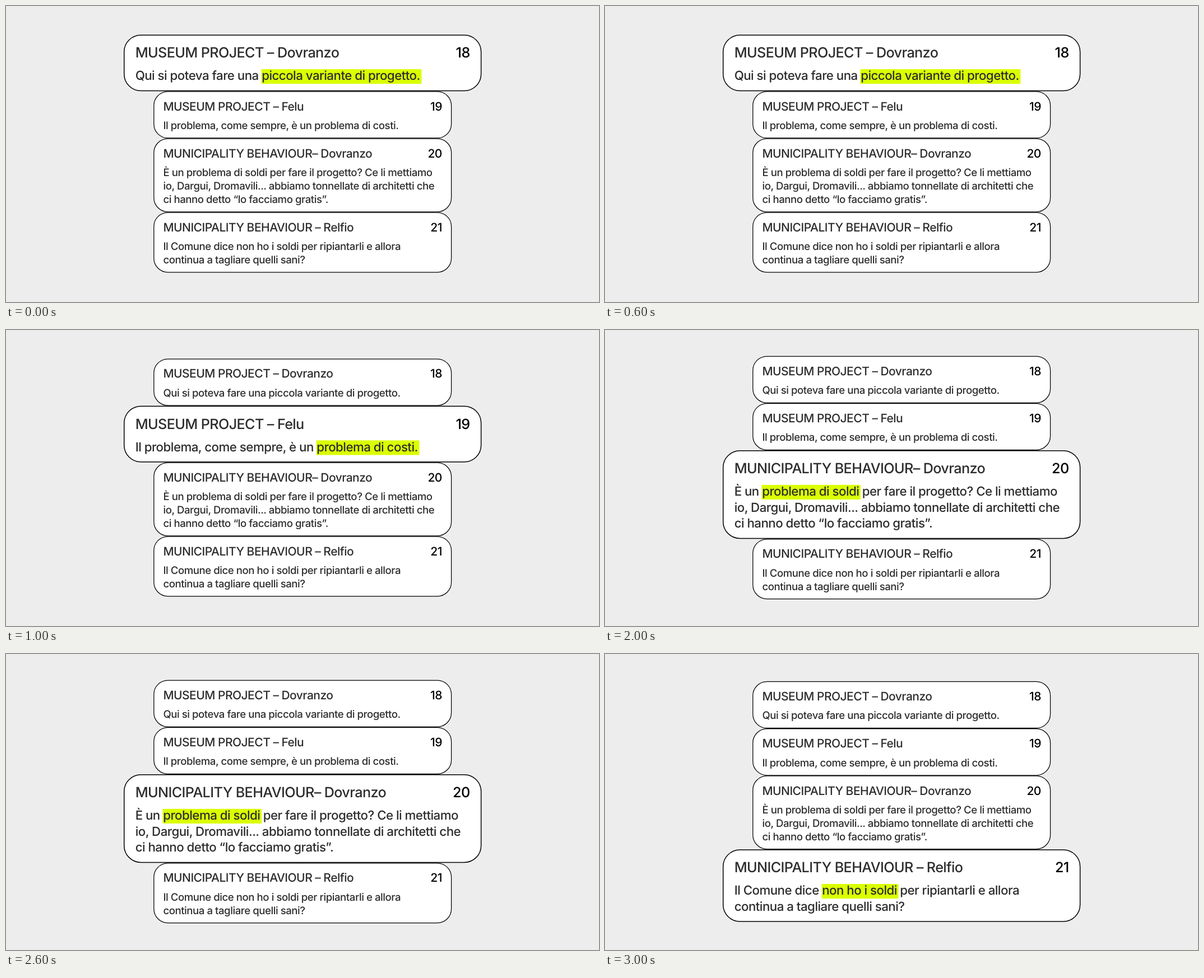
Animation of 1058 by 529 pixels, one loop 4 s. Source, as an HTML page:

```html
<!DOCTYPE html>
<html lang="it">
<head>
<meta charset="utf-8">
<title>Conversation cards</title>
<style>
  html, body { margin: 0; width: 100%; height: 100%; overflow: hidden; background: #ededed; }
  svg { display: block; }
  text {
    font-family: Inter, "Liberation Sans", sans-serif;
    font-optical-sizing: none;
    text-rendering: geometricPrecision;
    fill: #2d2d2d;
  }
  .title, .number { font-size: 21px; font-weight: 500; letter-spacing: -.025em; }
  .number { fill: #000; text-anchor: end; }
  .body { font-size: 18.6px; font-weight: 450; letter-spacing: -.024em; }
  .box { fill: #fff; stroke: #000; stroke-width: 1.25; }
  .mark { fill: #daff00; }
</style>
</head>
<body>
<svg id="stage" width="1058" height="529"></svg>
<script>
const STEP = 1000, WIDTH = 532, ZOOM = 1.2, LINE = 23.75;
const CENTER = { x: 529.2, y: 263.8 };
const stage = document.getElementById('stage');

const cards = [
  { title: 'MUSEUM PROJECT – Dovranzo', mark: 'piccola variante di progetto.',
    lines: ['Qui si poteva fare una piccola variante di progetto.'] },
  { title: 'MUSEUM PROJECT – Felu', mark: 'problema di costi.',
    lines: ['Il problema, come sempre, è un problema di costi.'] },
  { title: 'MUNICIPALITY BEHAVIOUR– Dovranzo', mark: 'problema di soldi',
    lines: ['È un problema di soldi per fare il progetto? Ce li mettiamo',
            'io, Dargui, Dromavili... abbiamo tonnellate di architetti che',
            'ci hanno detto “lo facciamo gratis”.'] },
  { title: 'MUNICIPALITY BEHAVIOUR – Relfio', mark: 'non ho i soldi',
    lines: ['Il Comune dice non ho i soldi per ripiantarli e allora',
            'continua a tagliare quelli sani?'] }
];

function add(parent, tag, attrs, content = '') {
  const el = document.createElementNS('http://www.w3.org/2000/svg', tag);
  for (const name in attrs) el.setAttribute(name, attrs[name]);
  el.textContent = content;
  return parent.appendChild(el);
}

function build(card, index) {
  card.height = 84.3 + LINE * (card.lines.length - 1);
  const g = card.group = add(stage, 'g', {});
  add(g, 'rect', { class: 'box', x: .62, y: .62, rx: 25, width: WIDTH - 1.24, height: card.height - 1.24 });
  card.highlight = add(g, 'rect', { class: 'mark', y: 51.5, height: 21.8 });
  add(g, 'text', { class: 'title', x: 17.2, y: 34.3 }, card.title);
  add(g, 'text', { class: 'number', x: 514.7, y: 34.3 }, 18 + index);
  const rows = card.lines.map((line, i) =>
    add(g, 'text', { class: 'body', x: 17.2, y: 67.7 + i * LINE }, line));

  // The highlighted phrase is always on the first row
  const start = card.lines[0].indexOf(card.mark);
  const left = rows[0].getStartPositionOfChar(start).x - .5;
  const right = rows[0].getEndPositionOfChar(start + card.mark.length - 1).x + 2.2;
  card.highlight.setAttribute('x', left);
  card.highlight.setAttribute('width', right - left);
}

function layout(active) {
  const scale = i => i === active ? ZOOM : 1;
  const total = cards.reduce((sum, card, i) => sum + card.height * scale(i), 0);
  let y = CENTER.y - total / 2;
  cards.forEach((card, i) => {
    const s = scale(i);
    card.group.setAttribute('transform', `translate(${CENTER.x - WIDTH * s / 2} ${y}) scale(${s})`);
    card.highlight.setAttribute('visibility', i === active ? 'visible' : 'hidden');
    y += card.height * s;
  });
}

let shown = -1;
function tick() {
  const active = Math.floor(performance.now() / STEP) % cards.length;
  if (active !== shown) layout(shown = active);
  requestAnimationFrame(tick);
}

cards.forEach(build);
tick();
</script>
</body>
</html>
```
